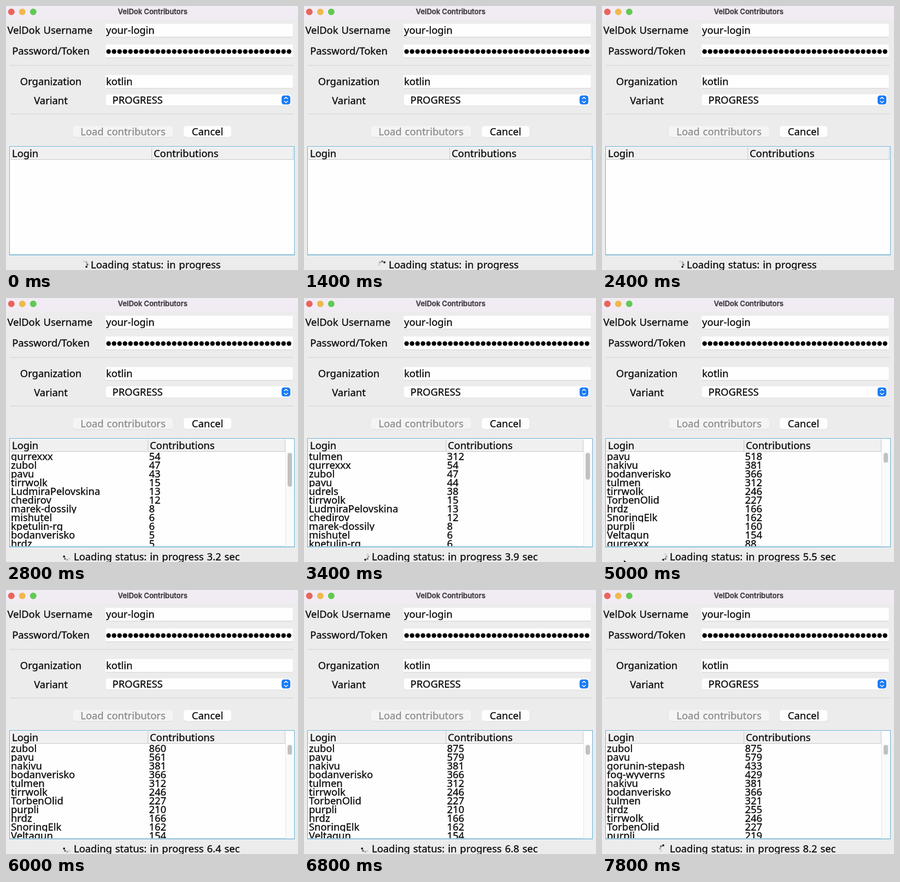
An HTML page with a canvas for the animation above (8000 ms loop, 534 by 484 pixels).

```html
<!DOCTYPE html>
<html lang="en">
<head>
<meta charset="utf-8">
<title>VelDok Contributors</title>
<style>
html, body { margin: 0; width: 100%; height: 100%; overflow: hidden; background: #ececec; }
canvas { display: block; width: 534px; height: 484px; }
</style>
</head>
<body>
<canvas id="stage" width="534" height="484"></canvas>
<script>
const ctx = document.getElementById('stage').getContext('2d');
const LOOP = 8000, STEP = 200, DATA_START = 2800;
const BODY_FONT = '18.4px "Noto Sans", "Open Sans", sans-serif';
const TITLE_FONT = '600 13px Inter, Roboto, sans-serif';
const INK = '#0c0c0c', WHITE = '#fefefe';

// Contribution counts as they arrive: [time, changed logins].
const updates = [
  [2800, { gurrexxx: 54, zubol: 47, pavu: 43, tirrwolk: 15, LudmiraPelovskina: 13, chedirov: 12,
    'marek-dossily': 8, mishutel: 6, 'kpetulin-rg': 6, bodanverisko: 5, hrdz: 5 }],
  [3400, { tulmen: 312, pavu: 44, udrels: 38 }],
  [4600, { pavu: 518, nakivu: 381, bodanverisko: 366, tirrwolk: 246, TorbenOlid: 227, hrdz: 166,
    SnoringElk: 162, purpli: 160, Veltagun: 154, gurrexxx: 88 }],
  [5400, { pavu: 561, purpli: 210 }],
  [5800, { zubol: 860 }],
  [6400, { zubol: 875, pavu: 579 }],
  [7000, { 'gorunin-stepash': 433, 'fog-wyverns': 429 }],
  [7400, { tulmen: 321, hrdz: 255, purpli: 219 }]
];
// Elapsed seconds shown in the status line: [time, seconds].
const clock = [[2800, '3.2'], [3400, '3.9'], [4600, '5.1'], [5000, '5.5'], [5400, '5.8'], [5800, '6.2'],
  [6000, '6.4'], [6400, '6.8'], [7000, '7.4'], [7400, '7.8'], [7800, '8.2']];
const thumbs = [[2800, 62], [3400, 49], [4600, 18]];

const latest = (list, t) => list.filter(([at]) => at <= t).pop()[1];

function rowsAt(t) {
  const counts = {};
  for (const [at, change] of updates) if (at <= t) Object.assign(counts, change);
  return Object.entries(counts).sort((a, b) => b[1] - a[1]).slice(0, 11);
}

function rect(x, y, w, h, color) {
  ctx.fillStyle = color;
  ctx.fillRect(x, y, w, h);
}

function pill(x, y, w, h, r, color) {
  ctx.fillStyle = color;
  ctx.beginPath();
  ctx.roundRect(x, y, w, h, r);
  ctx.fill();
}

function dot(x, y, r, color) {
  ctx.fillStyle = color;
  ctx.beginPath();
  ctx.arc(x, y, r, 0, Math.PI * 2);
  ctx.fill();
}

// A thin outline thickens the strokes a little.
function text(s, x, y, align = 'left', color = INK, font = BODY_FONT) {
  ctx.font = font;
  ctx.wordSpacing = font === BODY_FONT ? '1.2px' : '0px';
  ctx.textAlign = align;
  ctx.fillStyle = ctx.strokeStyle = color;
  ctx.lineWidth = .35;
  ctx.fillText(s, x, y);
  ctx.strokeText(s, x, y);
}

function clipped(x, y, w, h, draw) {
  ctx.save();
  ctx.beginPath();
  ctx.rect(x, y, w, h);
  ctx.clip();
  draw();
  ctx.restore();
}

function field(y) {
  rect(182, y, 342.5, 24, WHITE);
  rect(182, y + 24, 342.5, 1, '#d6d6d6');
}

// White control with a soft shadow under its lower edge.
function raised(x, y, w, h, fill) {
  pill(x - .3, y, w + .6, h + .8, 5.5, '#d8d8d8');
  pill(x, y, w, h, 5, fill);
}

function button(label, x, w, fill, color) {
  raised(x, 220, w, 20.5, fill);
  text(label, x + w / 2, 237, 'center', color);
}

function drawForm() {
  rect(0, 0, 534, 484, '#ececec');
  rect(0, 0, 534, 25, '#f1ecf3');
  ['#e8645d', '#efb84e', '#61c955'].forEach((c, i) => dot(9.8 + i * 20, 10.8, 6, c));
  text('VelDok Contributors', 331.8, 15, 'right', '#423e44', TITLE_FONT);

  text('VelDok Username', 158, 51, 'right');
  text('Password/Token', 82, 89, 'center');
  text('Organization', 82, 145, 'center');
  text('Variant', 82, 180, 'center');

  field(32.5);
  text('your-login', 183, 51);
  field(70.5);
  for (let i = 0; i < 34; i++) dot(187.6 + i * 10, 83.5, 4.2, '#000');
  field(126.5);
  text('kotlin', 183, 145);

  rect(7, 108.5, 519, 1, '#cfd0d2');
  rect(7, 197.5, 519, 1, '#cfd0d2');

  raised(182.3, 161.7, 339.4, 21, WHITE);
  text('PROGRESS', 194.5, 179);
  pill(504, 164, 16, 16.5, 4.5, '#1b7cf6');
  ctx.strokeStyle = WHITE;
  ctx.lineWidth = 1.4;
  ctx.lineCap = ctx.lineJoin = 'round';
  ctx.beginPath();
  for (const d of [-1, 1]) {
    ctx.moveTo(509, 172.2 + d * 2.2);
    ctx.lineTo(512, 172.2 + d * 5);
    ctx.lineTo(515, 172.2 + d * 2.2);
  }
  ctx.stroke();

  button('Load contributors', 122, 184, '#f4f4f4', '#8c8c8c');
  button('Cancel', 324.6, 87.8, WHITE, INK);
}

function drawHeader(right, split) {
  rect(8, 259, right - 8, 23, '#f0f0f0');
  rect(8, 281, right - 8, 1, '#c8c8c8');
  rect(split, 259, 1, 23, '#c8c8c8');
  rect(right - 1, 259, 1, 23, '#c8c8c8');
  text('Login', 11, 277);
  text('Contributions', split + 4, 277);
}

function drawTable(t) {
  rect(6, 257, 522, 200, '#68b0d6');
  rect(7, 258, 520, 197.5, WHITE);
  if (t < DATA_START) return drawHeader(526, 266);

  drawHeader(511, 259);
  clipped(7, 282, 504, 173, () => rowsAt(t).forEach(([login, count], i) => {
    const y = 283 + i * 16;
    clipped(7, y, 504, 16, () => {
      text(login, 9, y + 14.3);
      text(count, 261.5, y + 14.3);
    });
  }));
  rect(511, 282, 16, 173.5, '#fafafa');
  rect(511, 282, 1, 173.5, '#e6e6e6');
  pill(515, 284, 8, latest(thumbs, t), 4, '#c1c1c1');
}

function drawStatus(t) {
  const loaded = t >= DATA_START;
  const x = loaded ? 124 : 155;
  text('Loading status: in progress' + (loaded ? ` ${latest(clock, t)} sec` : ''), x, 481);

  const head = 2 * t / STEP + (loaded ? 0 : 1);
  ['#d2d2d2', '#a8a8a8', '#6c6c6c', '#1c1c1c'].forEach((color, i) => {
    const a = (head - 3 + i) * Math.PI / 4;
    dot(x - 12 + 5.8 * Math.cos(a), 474 + 5.8 * Math.sin(a), 1.9, color);
  });
}

function drawPointer() {
  ctx.fillStyle = '#111';
  ctx.beginPath();
  ctx.moveTo(40, 480.5);
  ctx.lineTo(46, 485);
  ctx.lineTo(40, 485);
  ctx.fill();
}

function frame(now) {
  const t = Math.floor(now % LOOP / STEP) * STEP;
  drawForm();
  drawTable(t);
  drawStatus(t);
  if (t >= 4800 && t < 5400) drawPointer();
  requestAnimationFrame(frame);
}
requestAnimationFrame(frame);
</script>
</body>
</html>
```
